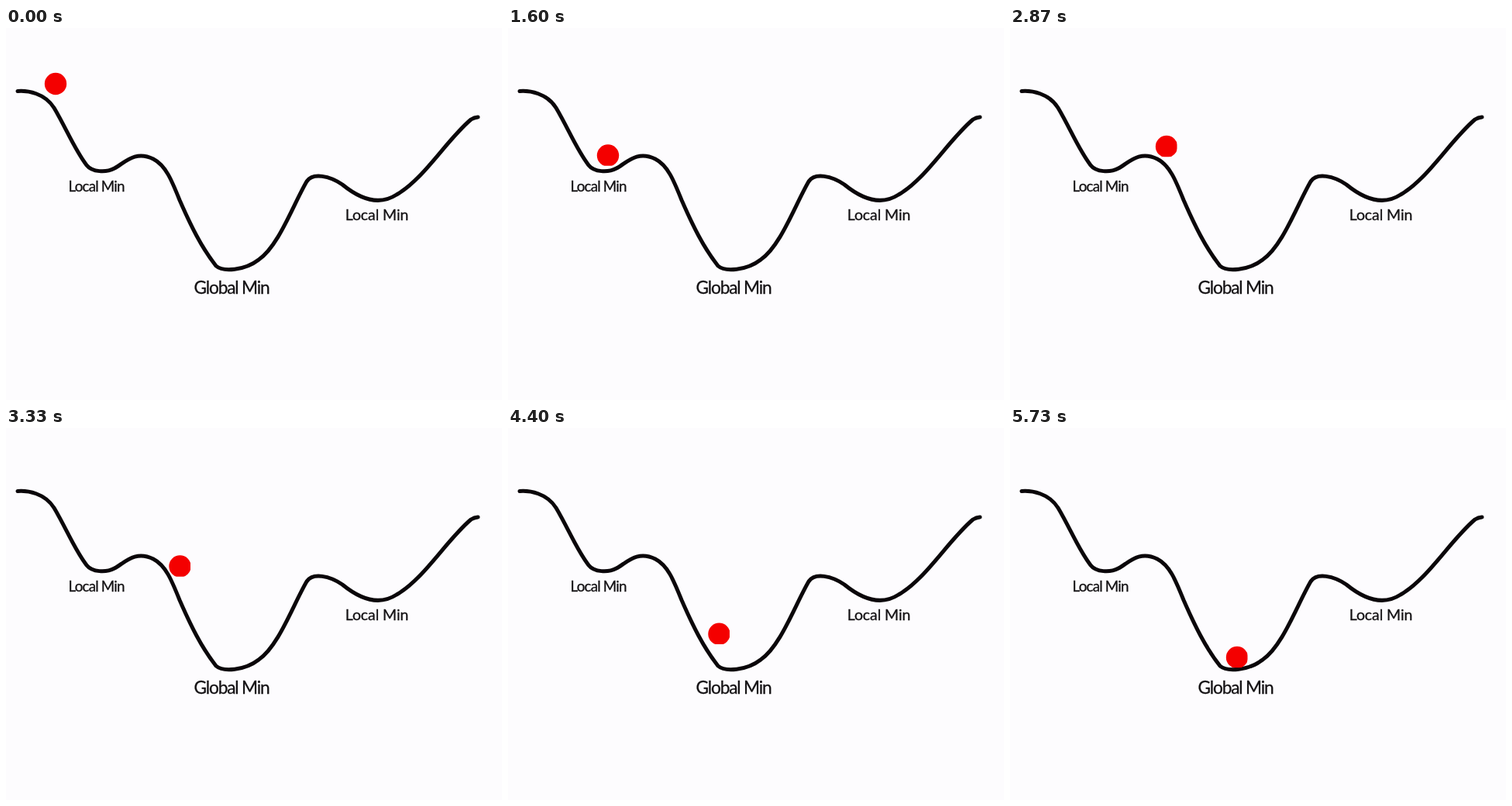
Animation, 640 px wide and 480 px high, one loop 6.87 s. Source, as an HTML page:

```html
<!DOCTYPE html>
<html lang="en">
<head>
<meta charset="utf-8">
<title>Local and global minima</title>
<style>
  html, body { margin: 0; width: 100%; height: 100%; overflow: hidden; background: #fdfcfe; }
  svg { display: block; width: 640px; height: 480px; }
  text {
    font-family: Lato, "Open Sans", sans-serif; text-anchor: middle;
    fill: #141214; stroke: #141214; stroke-width: .3;
  }
  .hill { fill: none; stroke: #0b070a; stroke-width: 5; stroke-linecap: round; }
</style>
</head>
<body>
<svg viewBox="0 0 640 480">
  <defs><clipPath id="cut"><rect id="cutBox" x="-16" y="-16"/></clipPath></defs>
  <path class="hill" d="M15 81.5
    C28 80.5 50 84 62 103 C78 130 88 156 104 177
    C111 186 129 187 140 181 C152 175 166 157 190 169
    C206 177 214 197 224 222 C238 254 252 283 271 307
    C280 315 308 313 326 299 C352 281 370 229 388 198
    C396 186 418 191 434 202 C456 220 481 230 504 215
    C540 194 568 145 600 118 Q604 115.5 609 115"/>
  <text x="116.6" y="211" font-size="18.8" letter-spacing="-.8">Local Min</text>
  <text x="478.5" y="247.7" font-size="19.5" letter-spacing="-.1">Local Min</text>
  <text x="291" y="342.7" font-size="22.7" letter-spacing="-1.2">Global Min</text>
  <g id="ball"><circle r="14.2" fill="#f40000" clip-path="url(#cut)"/></g>
</svg>
<script>
const LOOP = 6870, SLOT = 1000 / 15;
const ball = document.getElementById('ball');
const cutBox = document.getElementById('cutBox');

const even = u => u;
const speedUp = u => u ** 1.6;
const slowDown = u => 1 - (1 - u) ** 1.6;

// Each leg ends at a step and a place, with an upward bulge on the way
const start = { step: 0, x: 64, y: 72 };
const legs = [
  { step: 10, x: 98, y: 123, bulge: 0, ease: even },
  { step: 19, x: 129, y: 164.5, bulge: 0, ease: even },
  { step: 34, x: 202, y: 153, bulge: 11, ease: even },
  { step: 46, x: 247, y: 214, bulge: 5, ease: even },
  { step: 57, x: 287, y: 291, bulge: -3, ease: even },
  { step: 63, x: 317, y: 281, bulge: -3, ease: slowDown },
  { step: 69, x: 293, y: 296, bulge: -2.5, ease: speedUp }
];

function place(step) {
  const found = legs.findIndex(leg => step <= leg.step);
  const i = found < 0 ? legs.length - 1 : found;
  const a = legs[i - 1] || start, b = legs[i];
  const u = b.ease(Math.min(1, (step - a.step) / (b.step - a.step)));
  return [
    a.x + (b.x - a.x) * u,
    a.y + (b.y - a.y) * u - b.bulge * Math.sin(Math.PI * u)
  ];
}

function draw(now) {
  // 12 steps a second shown in 15 slots: every fifth slot repeats
  const slot = Math.floor((now % LOOP + 4) / SLOT);
  const step = slot - Math.floor((slot + 3) / 5);
  ball.setAttribute('transform', `translate(${place(step)})`);
  // The ball loses a sliver at the bottom, later also at the right
  cutBox.setAttribute('width', step < 30 ? 32 : 29.5);
  cutBox.setAttribute('height', step < 18 ? 32 : 29.3);
  requestAnimationFrame(draw);
}

draw(0);
</script>
</body>
</html>
```
